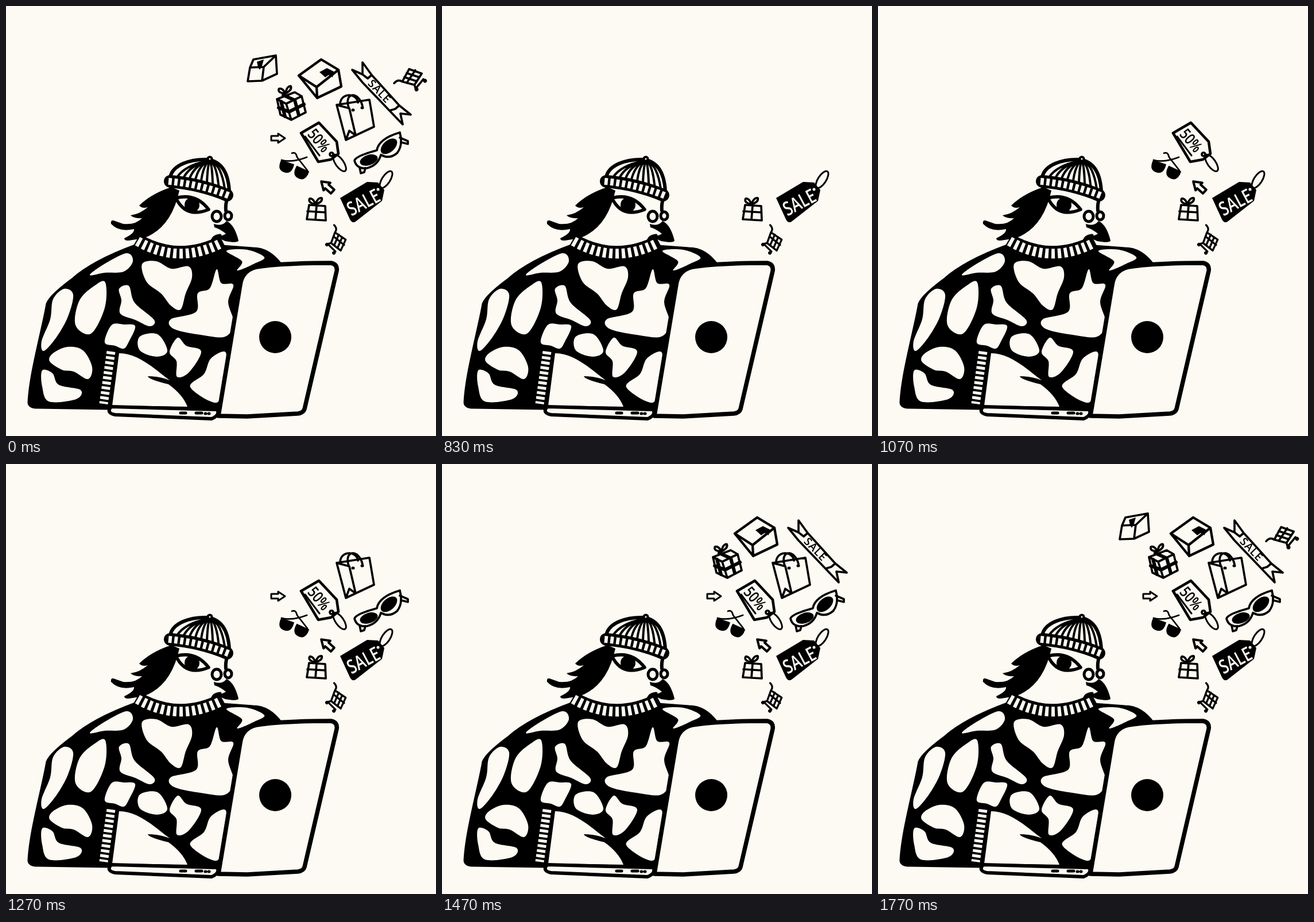
Animation of 749x748 px, one loop 3.13 s. Source, as an HTML page:

```html
<!DOCTYPE html>
<html lang="en">
<head>
<meta charset="utf-8">
<title>Bird shopping online</title>
<style>
  html, body { margin: 0; height: 100%; overflow: hidden; background: #fcfaf2; }
  svg { display: block; width: 100%; height: 100%; stroke-linecap: round; stroke-linejoin: round; }
  .ink { fill: #000; stroke: none; }
  .paper { fill: #fcfaf2; stroke: none; }
  .line { fill: none; stroke: #000; }
  .outlined { fill: #fcfaf2; stroke: #000; }
  .ribs { fill: none; stroke: #fcfaf2; stroke-linecap: butt; }
  text { font-family: "Open Sans", sans-serif; font-weight: 600; text-anchor: middle; stroke: none; }
</style>
</head>
<body>
<svg viewBox="0 0 749 748">
  <defs>
    <g id="cart">
      <path d="M-20-35Q-10-36-8-27L3-8L26-13L16-34L-8-27M-4-20L22-25M0-30L10-10M8-32L18-12M3-8L0-2L21-4"/>
      <circle class="ink" r="3.4"/><circle class="ink" cx="21" r="3.4"/>
    </g>
    <path id="arrow" d="M-12-4H0V-8L12 0L0 8V4H-12Z"/>
    <path id="bow" d="M0 0Q-14-3-10-10Q-4-11 0 0Q4-12 11-11Q13-4 0 0"/>
    <ellipse id="string" rx="7" ry="17" stroke-width="3"/>
    <path id="lens" class="ink" d="M-12-8L12-8Q14 11 0 11Q-14 11-12-8Z"/>
  </defs>

  <!-- sweater -->
  <path stroke="#000" stroke-width="3" d="M225 416Q151 443 115 475Q76 504 71 518C64 560 41 640 39 690Q40 699 55 699L180 701L375 706L410 520L480 450Q459 421 430 421L376 417Z"/>
  <g id="patches" class="paper">
    <path data-pts="146,468 171,449 210,430 221,444 205,462 172,464"/>
    <path data-pts="101,492 117,502 108,540 88,576 66,600 62,583 77,545 82,510"/>
    <path data-pts="155,486 173,481 172,525 148,570 121,555 128,512"/>
    <path data-pts="197,492 214,487 224,516 258,546 250,557 225,546 199,535 201,512"/>
    <path data-pts="237,449 262,444 288,457 318,453 324,472 313,500 304,528 287,521 270,500 245,480"/>
    <path data-pts="367,458 375,482 396,485 387,515 397,552 382,575 345,573 293,562 287,545 331,532 334,500 355,491"/>
    <path data-pts="384,426 420,424 450,437 433,448 403,460 411,444"/>
    <path data-pts="172,585 184,555 205,554 225,557 214,584 205,596 190,591"/>
    <path data-pts="233,575 264,571 281,600 262,610 233,599"/>
    <path data-pts="299,577 314,591 340,601 319,637 298,645 297,618 285,602"/>
    <path data-pts="107,593 134,599 150,628 143,649 118,636 98,633 76,618 82,604"/>
    <path data-pts="63,634 81,639 92,659 130,668 122,684 75,688 63,662"/>
    <path data-pts="383,603 377,650 367,690 321,663 345,640 357,613"/>
  </g>
  <path class="paper" d="M197 604C230 604 260 632 285 651Q268 644 247 644Q249 650 283 658Q308 676 316 697L185 695Z"/>
  <path class="ribs" d="M183 601L170 692" stroke-width="15" stroke-dasharray="5 3.8"/>

  <!-- laptop -->
  <path class="outlined" stroke-width="6" d="M183 697L368 702Q373 712 358 718L190 711Q174 708 183 697Z"/>
  <path class="line" stroke-width="5" d="M304 708H313M331 708H341M347 709H348M353 709H354"/>
  <path class="outlined" stroke-width="7.5" d="M370 713L408 485Q411 460 436 454Q480 447 566 447Q578 449 576 461L520 701Q518 708 508 709L420 714Z"/>
  <circle class="ink" cx="469" cy="576" r="28"/>

  <!-- head -->
  <path class="paper" d="M300 318L385 335L384 376L360 416Q300 428 240 402Z"/>
  <path class="ink" d="M288 315Q254 326 232 347Q237 353 247 350Q233 362 217 364Q222 370 237 369Q226 381 204 379L187 373Q182 372 183 379Q197 394 223 388Q224 396 206 404Q206 410 220 407L240 404Q288 386 302 321Z"/>
  <g class="line" stroke-width="5">
    <path d="M385 336Q382 346 383 356" stroke-width="6"/>
    <ellipse class="outlined" cx="367" cy="366" rx="8" ry="9"/>
    <ellipse class="outlined" cx="387" cy="365" rx="6" ry="7"/>
    <path d="M373 399Q361 400 359 409L367 415"/>
  </g>
  <path class="ink" d="M362 379Q377 384 384 374Q398 380 405 408Q404 413 382 409L366 402Q377 400 383 396Q373 388 363 385Z"/>
  <g id="open">
    <path class="outlined" stroke-width="5.500" d="M296 334Q331 325 353 354Q313 370 296 334Z"/>
    <ellipse class="ink" cx="324" cy="346" rx="13" ry="13"/>
  </g>
  <path id="shut" class="line" stroke-width="5" d="M297 343Q307 360 325 362Q342 362 352 354"/>

  <!-- beanie and collar -->
  <path class="outlined" stroke-width="6" d="M286 298C290 276 322 266 350 267Q386 271 389 322Z"/>
  <circle class="outlined" stroke-width="4" cx="355" cy="266" r="3.500"/>
  <path id="knit" class="line" stroke-width="4"/>
  <path class="line" stroke-width="22" d="M286 305Q340 310 385 329"/>
  <path class="ribs" stroke-width="12" stroke-dasharray="5.800 4.400" d="M283 305Q340 310 391 331"/>
  <path class="line" stroke-width="26" stroke-linecap="butt" d="M227 408Q301 451 378 411"/>
  <path class="ribs" stroke-width="17" stroke-dasharray="6 5" d="M229 409Q301 451 376 412"/>

  <!-- shopping things, in order of appearance -->
  <g class="line" stroke-width="3.700">
    <g data-at="730"><use href="#cart" transform="translate(559 415) rotate(50) scale(.9)"/></g>
    <g data-at="770">
      <path d="M528 346L556 348L557 373L524 371ZM525 357L556 359M541 347L539 372"/>
      <use href="#bow" x="539" y="345"/>
    </g>
    <g data-at="830">
      <path class="ink" d="M582 334L629 306L648 307L659 320L655 339L609 375Q603 379 599 371Z"/>
      <use href="#string" transform="translate(662 302) rotate(33)"/>
      <circle class="paper" cx="648" cy="319" r="2.500"/>
      <text class="paper" transform="translate(628 352) rotate(-28) scale(.76 1)" font-size="34">SALE</text>
    </g>
    <g data-at="930"><use href="#arrow" transform="translate(559 314) rotate(222) scale(1.1)"/></g>
    <g data-at="1000">
      <path stroke-width="2.700" d="M480 268Q498 273 524 263M498 256Q505 253 507 263L525 286"/>
      <use href="#lens" transform="translate(488 279) rotate(20)"/>
      <use href="#lens" transform="translate(514 290) rotate(25)"/>
    </g>
    <g data-at="1070">
      <path stroke-width="4.600" d="M514 221L545 203L576 236L579 257L566 267L544 271Z"/>
      <path stroke-width="3" d="M521 227L546 260"/>
      <circle cx="567" cy="258" r="3"/>
      <use href="#string" transform="translate(581 273) rotate(-35)"/>
      <text class="ink" transform="translate(538 240) rotate(50) scale(.8 1)" font-size="27">50%</text>
    </g>
    <g data-at="1130">
      <path class="outlined" d="M607 269Q609 261 646 251Q649 231 686 220Q692 243 681 256Q668 267 653 259Q648 277 629 282Q611 284 607 269Z"/>
      <path d="M686 229L700 235V240L688 237M616 281L618 291L624 289L626 282"/>
      <ellipse class="ink" cx="632" cy="268" rx="16" ry="9" transform="rotate(-18 632 268)"/>
      <ellipse class="ink" cx="667" cy="244" rx="17" ry="10" transform="rotate(-42 667 244)"/>
    </g>
    <g data-at="1200"><use href="#arrow" x="474" y="230" stroke-width="3"/></g>
    <g data-at="1260">
      <path d="M576 172L633 163L641 210L592 233ZM576 172L598 178L609 225M592 233L598 217L609 225M582 174C580 150 611 150 613 168M597 177C588 150 614 147 621 174"/>
      <path d="M604 181H605M620 177H621" stroke-width="5"/>
    </g>
    <g data-at="1320">
      <path d="M472 162L503 150L515 157L522 185L497 198L478 189ZM472 162L488 170L515 157M488 170L497 198"/>
      <path d="M483 155L503 164L510 190M475 177L493 184L519 171M479 166L486 192" stroke-width="6"/>
      <use href="#bow" transform="translate(487 152) rotate(-10)"/>
    </g>
    <g data-at="1370">
      <path d="M621 98L637 120L685 173L705 189L687 187L691 206L668 182L621 133L603 111L621 119ZM621 119L630 126L637 120M668 182L678 179L685 173"/>
      <text class="ink" transform="translate(646 153) rotate(46)" font-size="19" letter-spacing="1">SALE</text>
    </g>
    <g data-at="1470">
      <path stroke-width="4.300" d="M549 93L510 121L542 160L584 140L579 111ZM510 121L541 141L579 111M541 141L542 160"/>
      <path class="ink" d="M546 115L559 108L571 114L569 124L562 120L556 124Z"/>
    </g>
    <g data-at="1530"><use href="#cart" transform="translate(715 145) rotate(-45)"/></g>
    <g data-at="1570">
      <path d="M425 107L431 93L470 86L472 118L446 130L421 131ZM425 107L449 106L470 86M449 106L446 130"/>
      <path class="ink" d="M437 97L449 93L446 104L442 111L439 106Z"/>
    </g>
  </g>
</svg>
<script>
  const LOOP = 3130, CLEAR = 670, SHUT = 1670, OPEN = 1770, RIBS = 9;
  const byId = id => document.getElementById(id);
  const show = (el, on) => el.style.visibility = on ? 'visible' : 'hidden';

  // Closed Catmull-Rom curve through the given points
  function smooth(pts) {
    const at = i => pts.at(i % pts.length);
    const handle = (i, sign) => at(i).map((v, k) => v + sign * (at(i + 1)[k] - at(i - 1)[k]) / 6);
    return `M${pts[0]}` + pts.map((_, i) => `C${handle(i, 1)} ${handle(i + 1, -1)} ${at(i + 1)}`).join('') + 'Z';
  }

  for (const patch of byId('patches').children)
    patch.setAttribute('d', smooth(patch.dataset.pts.split(' ').map(p => p.split(',').map(Number))));

  // Ribs fan out from the pompom to the brim
  let knit = '';
  for (let i = 0; i < RIBS; i++) {
    const u = i / (RIBS - 1), top = 349 + 9 * u, x = 298 + 83 * u;
    knit += `M${top} 270Q${top + (x - top) * .75} 278 ${x} ${298 + 20 * u}`;
  }
  byId('knit').setAttribute('d', knit);

  const items = document.querySelectorAll('[data-at]');

  function draw() {
    const t = performance.now() % LOOP;
    for (const item of items) show(item, t < CLEAR || t >= +item.dataset.at);
    const blinking = t >= SHUT && t < OPEN;
    show(byId('open'), !blinking);
    show(byId('shut'), blinking);
    requestAnimationFrame(draw);
  }
  draw();
</script>
</body>
</html>
```
